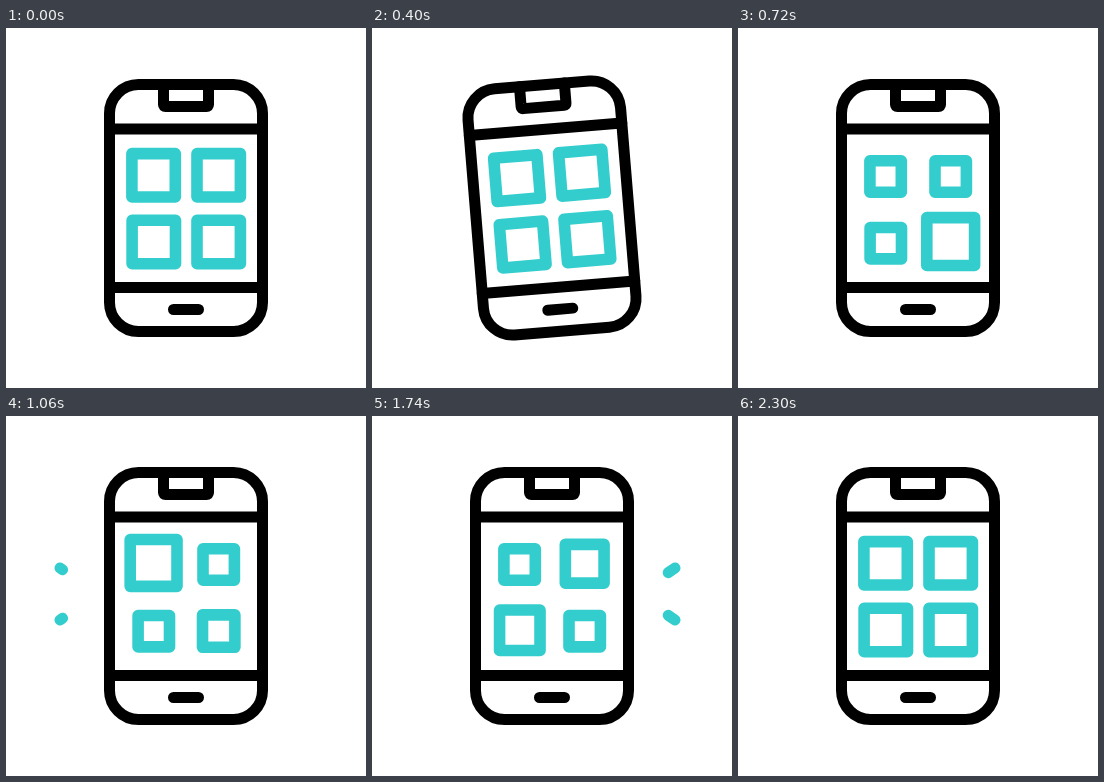
Animation of 360x360 px, one loop 2.4 s. Source, as an HTML page:

```html
<!DOCTYPE html>
<html lang="en">
<head>
<meta charset="utf-8">
<title>Phone notifications</title>
<style>
  html, body { margin: 0; width: 100%; height: 100%; overflow: hidden; background: #fff; }
  svg { display: block; width: 100%; height: 100%; }
  path, rect, line { fill: none; stroke-linecap: round; stroke-linejoin: round; }
  .body { stroke: #000; stroke-width: 11; }
  .tile { stroke: #34cdcd; stroke-width: 11.6; }
  .ray { stroke: #34cdcd; stroke-width: 11; }
</style>
</head>
<body>
<svg viewBox="0 0 360 360">
  <g id="phone">
    <g class="body">
      <rect x="103.5" y="56.5" width="153" height="247" rx="29"/>
      <path d="M157.5 56.5V76.6q0 2 2 2h41q2 0 2-2V56.5M103.5 101H256.5M103.5 259.5H256.5M167.5 281.5H192.5"/>
    </g>
    <g id="tiles"></g>
  </g>
  <g id="rays"></g>
</svg>
<script>
const LOOP = 2400;
const FULL = 55, SMALL = 43, BIG = 59.4;
const STROKE = 11.6;
const byId = id => document.getElementById(id);

function add(parent, tag, cls) {
  const el = document.createElementNS('http://www.w3.org/2000/svg', tag);
  el.setAttribute('class', cls);
  return byId(parent).appendChild(el);
}

function set(el, attrs) {
  for (const k in attrs) el.setAttribute(k, attrs[k]);
}

// Value at time t on straight runs between [time, value] keys.
function track(keys, t) {
  if (t <= keys[0][0]) return keys[0][1];
  for (let i = 1; i < keys.length; i++) {
    const [t0, a] = keys[i - 1], [t1, b] = keys[i];
    if (t < t1) return a + (b - a) * (t - t0) / (t1 - t0);
  }
  return keys[keys.length - 1][1];
}

const shake = [[83, 0], [285, 17.5], [468, -17.5], [636, 0]];

// Each tile takes its turn being big between the times listed.
const tiles = [
  { x: 147.6, y: 147.3, keys: [[625, FULL], [715, SMALL], [760, SMALL], [1080, BIG], [1285, BIG], [1485, SMALL]] },
  { x: 212.7, y: 147.3, keys: [[625, FULL], [715, SMALL], [1285, SMALL], [1485, BIG], [1570, BIG], [1880, SMALL]] },
  { x: 147.8, y: 214, keys: [[625, FULL], [715, SMALL], [1570, SMALL], [1880, BIG]] },
  { x: 212.7, y: 214, keys: [[625, FULL], [715, BIG], [760, BIG], [1080, SMALL]] }
];
for (const tile of tiles) {
  tile.keys.push([2045, tile.keys[tile.keys.length - 1][1]], [2300, FULL]);
  tile.el = add('tiles', 'rect', 'tile');
}

// Bursts: the outer end grows out first, then the inner end follows.
const bursts = [
  { side: -1, grow: [760, 920], fade: [920, 1080] },
  { side: 1, grow: [1285, 1485], fade: [1570, 1820] },
  { side: -1, grow: [2045, 2172], fade: [2172, 2300] }
];
for (const b of bursts) b.els = [-1, 1].map(dir => ({ dir, el: add('rays', 'line', 'ray') }));

function drawTile({ x, y, keys, el }, t) {
  const size = track(keys, t), w = size - STROKE;
  const cy = y + (FULL - size) * 0.1;
  set(el, { x: x - w / 2, y: cy - w / 2, width: w, height: w });
}

function drawBurst({ side, grow, fade, els }, t) {
  const on = t > grow[0] && t < fade[1];
  const head = track([[grow[0], 0], [grow[1], 1]], t);
  const tail = track([[fade[0], 0], [fade[1], 1]], t);
  const px = p => 178.5 + side * (103 + 21.5 * p);
  const py = (p, dir) => 178 + dir * (11.3 + 14.7 * p);
  for (const { dir, el } of els) {
    set(el, {
      x1: px(tail), y1: py(tail, dir), x2: px(head), y2: py(head, dir),
      visibility: on ? 'visible' : 'hidden'
    });
  }
}

function draw(t) {
  set(byId('phone'), { transform: `rotate(${track(shake, t)} 180 180)` });
  tiles.forEach(tile => drawTile(tile, t));
  bursts.forEach(b => drawBurst(b, t));
}

const start = performance.now();
function tick() {
  draw((performance.now() - start) % LOOP);
  requestAnimationFrame(tick);
}
draw(0);
requestAnimationFrame(tick);
</script>
</body>
</html>
```
